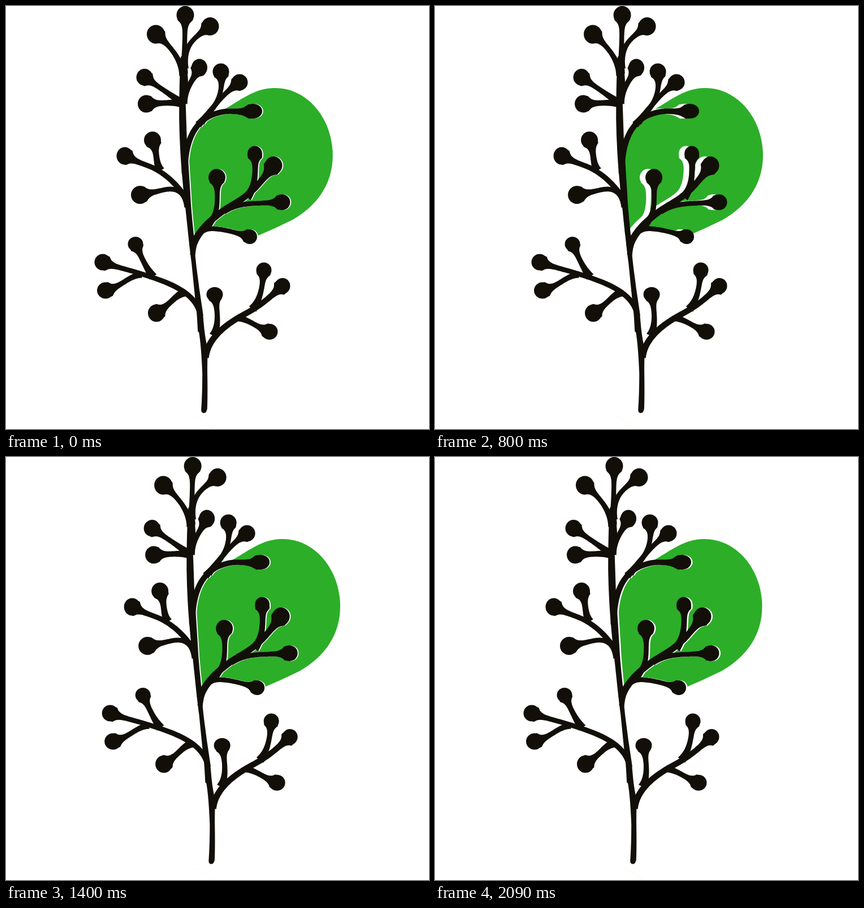
An HTML page that plays this animation: 748x748 px, repeating every 2130 ms.

```html
<!DOCTYPE html>
<html lang="en">
<head>
<meta charset="utf-8">
<title>Swaying twig</title>
<style>
  html, body { margin: 0; height: 100%; overflow: hidden; background: #fff; }
  svg { display: block; width: 100vw; height: 100vh; }
</style>
</head>
<body>
<svg viewBox="0 0 748 748">
  <defs>
    <g id="plant">
      <path d="M310 90C307 130 307 160 307 200C308 260 312 300 316 340C321 380 324 420 329 455L336 525
        C339 545 339 560 340 575L342 577C346 600 347 625 348 650Q348 685 346 714Q346 719 350 719Q354 719 355 712
        C357 660 353 630 357 605L354 598C349 575 349 560 347 540L341 500C336 460 333 445 333 425
        C332 405 327 375 325 330C323 300 321 265 319 235L317 175C318 160 322 140 321 130L318 90Z"/>
    </g>
  </defs>
  <path id="glint" d="M324 726Q340 736 358 748" fill="none" stroke="#fcf8e4"/>
  <g id="leaf">
    <path fill="#2cae28" d="M366 190L380 185C412 168 436 145 474 145C532 145 576 200 576 264
      C576 318 545 355 505 378Q475 393 444 406L432 408C400 395 375 394 362 392L346 400L331 408
      C324 350 319 300 320 262Q330 200 366 190Z"/>
    <use href="#plant" fill="#fff" stroke="#fff"/>
  </g>
  <use id="stem" href="#plant" fill="#120f09" stroke="#120f09"/>
</svg>
<script>
const $ = id => document.getElementById(id);
const plant = $('plant');
plant.firstElementChild.setAttribute('stroke-width', 1.6);

function add(tag, attrs) {
  const el = document.createElementNS('http://www.w3.org/2000/svg', tag);
  for (const key in attrs) el.setAttribute(key, attrs[key]);
  el.setAttribute('stroke', 'none');
  return plant.appendChild(el);
}

// A tapered limb along a curve, flared at its root and at the berry on its end.
function twig(curve, rx, ry = rx, mid = 4.4, root = 3.5) {
  const line = add('path', { d: curve });
  const length = line.getTotalLength();
  const left = [], right = [];
  const steps = 48;
  for (let i = 0; i <= steps; i++) {
    const s = length * i / steps;
    const p = line.getPointAtLength(s);
    const a = line.getPointAtLength(Math.max(0, s - 1));
    const b = line.getPointAtLength(Math.min(length, s + 1));
    const angle = Math.atan2(b.y - a.y, b.x - a.x);
    const gap = Math.max(0, length - s - rx * 0.6);
    const half = mid * (1 - 0.15 * s / length) + root * Math.exp(-s / 18)
      + ry * 0.62 * Math.exp(-gap / (rx * 0.42));
    const dx = -Math.sin(angle) * half, dy = Math.cos(angle) * half;
    left.push([p.x + dx, p.y + dy]);
    right.unshift([p.x - dx, p.y - dy]);
  }
  line.setAttribute('d', 'M' + left.concat(right).join('L') + 'Z');
  const end = curve.split(/[^\d.]+/).slice(-2);
  add('ellipse', { cx: end[0], cy: end[1], rx, ry });
}

// crown
twig('M314 118C316 85 316 60 317 16', 15.5, 16);
twig('M314 122C309 98 296 74 265 50', 16, 16.5);
twig('M315 110C316 68 330 58 361 36', 15.5, 16);
twig('M312 172C295 160 270 143 245 126', 14.5, 15);
twig('M312 172C295 170 275 172 248 173', 15, 15.5);
twig('M313 172C318 145 328 135 342 109', 14, 15.5);
// upper right
twig('M316 296C316 222 345 198 372 190S405 189 437 186', 16, 13, 5.4, 0);
twig('M340 210C366 182 386 165 380 116', 14.5, 14.5, 4.6, 2);
twig('M345 206C372 172 384 155 413 135', 14.5, 14.5, 4.6, 2);
// upper left
twig('M318 340C298 308 272 290 250 282S225 272 210 265', 14.5, 15.5, 5, 0);
twig('M273 291C264 276 268 260 259 237', 15);
twig('M320 356C316 322 294 322 280 325S255 331 237 334', 16, 16, 4.6, 0);
// middle right
twig('M330 426C338 399 365 373 400 352S442 322 473 282', 15.5, 16, 6.2, 0);
twig('M426 338C440 322 442 300 440 261', 13, 13.5, 5);
twig('M358 387C376 366 374 350 373 303', 15, 15, 4.4, 2);
twig('M385 363C415 346 440 350 488 347', 14.5, 14, 4.6, 1);
twig('M330 440C334 402 348 392 370 394S410 402 431 408', 13, 13, 4.6, 0);
// lower left
twig('M344 548C338 508 290 490 250 477S205 465 171 453', 14.5, 14.5, 4.9, 0);
twig('M260 479C246 460 240 445 229 421', 13.5, 13);
twig('M240 475C215 478 207 495 176 503', 15, 14.5, 4.6, 1);
twig('M316 506C296 514 295 524 266 543', 15, 15.5);
// lower right
twig('M353 622C356 590 385 565 420 546S460 520 489 495', 13.5, 14, 5.7, 0);
twig('M367 583C376 565 375 545 369 510', 14.5, 13);
twig('M436 536C450 518 453 500 456 467', 13.5);
twig('M409 551C432 556 440 566 466 576', 14.5, 14, 4.4, 2);

const LOOP = 2130, FRAMES = 64;
const ease = u => u < 0.5 ? 4 * u ** 3 : 1 - 4 * (1 - u) ** 3;

// There-and-back sway between two offsets, started after a delay.
function sway(el, time, delay, from, to) {
  const phase = (time - delay + LOOP) % LOOP / LOOP * 2;
  const x = from + (to - from) * ease(phase < 1 ? phase : 2 - phase);
  el.setAttribute('transform', `translate(${x.toFixed(2)})`);
}

function draw(now) {
  const step = LOOP / FRAMES;
  const time = Math.floor((now % LOOP + 9) / step) % FRAMES * step;
  sway($('stem'), time, 0, 0, 15);
  sway($('leaf'), time, LOOP / 6, -0.5, 15);
  sway($('glint'), time, LOOP / 3, -1, 12.5);
}

const start = performance.now();
function tick() {
  draw(performance.now() - start);
  requestAnimationFrame(tick);
}
tick();
</script>
</body>
</html>
```
